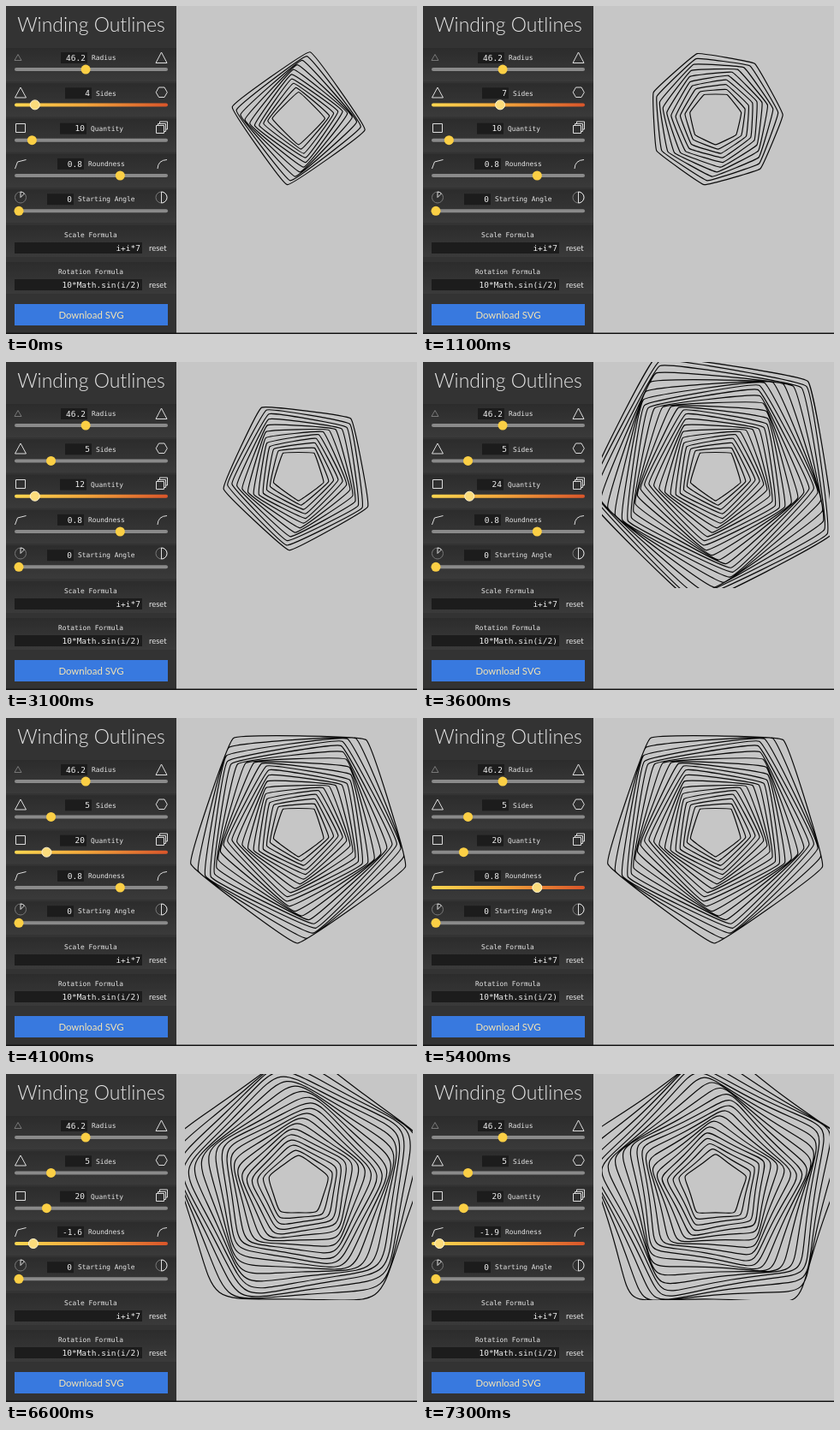
An HTML page that plays this animation: 480 px wide and 383 px high, repeating every 7400 ms.

```html
<!DOCTYPE html>
<html lang="en">
<head>
<meta charset="utf-8">
<title>Winding Outlines</title>
<style>
  html, body { margin: 0; height: 100%; overflow: hidden; background: #c6c6c6; }
  svg { display: block; }
  text { fill: #e6e6e6; font-family: "DejaVu Sans Mono", monospace; font-size: 7.9px; }
  .value { font-size: 9.5px; text-anchor: end; fill: #eee; }
  .sans { font-family: Lato, sans-serif; }
  .mid { text-anchor: middle; }
  .icon { fill: none; stroke: #ddd; stroke-width: 1; }
  .dim { stroke: #777; }
  .box { fill: #1c1c1c; }
</style>
</head>
<body>
<svg id="stage" width="480" height="383" viewBox="0 0 480 383"></svg>
<script>
const LOOP = 7400, STEP = 100;
const UNIT = 0.665, CX = 341.7, CY = 131.2;
const stage = document.getElementById('stage');

// x: right edge of the value box
const sliders = [
  { key: 'radius', label: 'Radius', min: 0, max: 100, x: 95, digits: 1,
    icons: '<path d="M14 56.5L18 63.5H10Z" class="dim"/><path d="M181.5 54L188 66.5H175Z"/>' },
  { key: 'sides', label: 'Sides', min: 3, max: 12, x: 100, digits: 0,
    icons: '<path d="M17 95L23.5 107H10.5Z"/><path d="M178.5 95H185L188.3 100.8L185 106.5H178.5L175.2 100.8Z"/>' },
  { key: 'quantity', label: 'Quantity', min: 1, max: 100, x: 94, digits: 0,
    icons: '<path d="M11.5 137.5h11v10h-11Z"/><path d="M175.5 139.5h9v9h-9ZM177.5 139v-1.5h9v9h-1.5M179.5 137v-2h9v9h-1.5"/>' },
  { key: 'roundness', label: 'Roundness', min: -2, max: 2, x: 91, digits: 1,
    icons: '<path d="M10.5 190L13.5 182L23.5 179.5"/><path d="M177 190Q177.5 180 188 179.5"/>' },
  { key: 'angle', label: 'Starting Angle', min: 0, max: 360, x: 79, digits: 0,
    icons: '<circle cx="17" cy="223.5" r="6.5" class="dim"/><path d="M17 217V223.5L21.5 219A6.5 6.5 0 0 0 17 217Z"/>' +
      '<circle cx="181.5" cy="223.5" r="6.5" class="dim"/><path d="M181.5 217V230A6.5 6.5 0 0 0 181.5 217Z"/>' },
];
const formulas = [['Scale Formula', 'i+i*7', 270], ['Rotation Formula', '10*Math.sin(i/2)', 313]];

const rect = (x, y, w, h, extra) => `<rect x="${x}" y="${y}" width="${w}" height="${h}" ${extra}/>`;
const rowY = k => 60 + 41.3 * k;

function sliderMarkup(s, k) {
  const y = rowY(k);
  return rect(0, y - 11, 199, 39, 'fill="url(#band)"') +
    `<g class="icon">${s.icons}</g>` +
    rect(s.x - 31, y - 6, 31, 13, 'class="box"') +
    `<text class="value" id="${s.key}Value" x="${s.x - 2}" y="${y + 3.6}"></text>` +
    `<text x="${s.x + 5}" y="${y + 3.2}">${s.label}</text>` +
    rect(10, y + 12.1, 179, 4, `rx="2" id="${s.key}Track"`) +
    `<circle id="${s.key}Thumb" cy="${y + 14.1}" r="5.5"/>`;
}

function formulaMarkup([label, code, y]) {
  return rect(0, y - 14, 199, 37, 'fill="url(#band)"') +
    `<text class="mid" x="99" y="${y - 0.5}">${label}</text>` +
    rect(10, y + 6, 149, 13, 'class="box"') +
    `<text class="value" x="157" y="${y + 16}">${code}</text>` +
    `<text class="sans" x="167" y="${y + 15.5}" style="font-size:9.4px">reset</text>`;
}

stage.innerHTML = `
  <defs>
    <linearGradient id="band" x2="0" y2="1">
      <stop stop-color="#2c2c2c"/><stop offset="1" stop-color="#3a3a3a"/>
    </linearGradient>
    <linearGradient id="hot">
      <stop stop-color="#fbd650"/><stop offset=".45" stop-color="#f3a83c"/><stop offset="1" stop-color="#d9552a"/>
    </linearGradient>
    <clipPath id="view">${rect(209, 0, 266, 264, '')}</clipPath>
  </defs>
  ${rect(0, 0, 480, 383, 'fill="#c6c6c6"')}
  <path id="art" clip-path="url(#view)" fill="none" stroke="#0a0a0a" stroke-width="1.2"/>
  ${rect(0, 0, 199, 383, 'fill="#333"')}
  <text class="sans mid" x="99.5" y="30" style="font-size:23px;font-weight:300">Winding Outlines</text>
  ${sliders.map(sliderMarkup).join('')}
  ${formulas.map(formulaMarkup).join('')}
  ${rect(10, 348, 179, 25, 'fill="#3879df"')}
  <text class="sans mid" x="99.5" y="364.5" style="font-size:11.4px;fill:#f3e3b4">Download SVG</text>
  ${rect(0, 381.5, 480, 1.5, 'fill="#151515"')}`;

// Linear interpolation through [time, value] keys
function track(keys, t) {
  const n = keys.findIndex(k => k[0] > t);
  if (n < 0) return keys[keys.length - 1][1];
  if (n === 0) return keys[0][1];
  const [t0, a] = keys[n - 1], [t1, b] = keys[n];
  return a + (b - a) * (t - t0) / (t1 - t0);
}

const sidesKeys = [[0, 4], [700, 7], [1850, 7], [2400, 5]];
const quantityKeys = [[2800, 10], [3100, 12], [3500, 23], [3600, 24], [4050, 20]];
const roundKeys = [[5500, 0.8], [5900, 0.4], [6000, -0.5], [6600, -1.6], [7300, -1.9]];

function stateAt(t) {
  return {
    radius: 46.2,
    sides: Math.round(track(sidesKeys, t)),
    quantity: Math.round(track(quantityKeys, t)),
    roundness: Math.round(track(roundKeys, t) * 10) / 10,
    angle: 0,
    active: t < 2700 ? 'sides' : t < 5100 ? 'quantity' : 'roundness',
  };
}

// Closed cardinal spline through the corners of a regular polygon
function polygonPath(sides, r, turn, tension) {
  const corner = k => {
    const a = 2 * Math.PI * k / sides + turn;
    return [CX + r * Math.sin(a), CY + r * Math.cos(a)];
  };
  const handle = (k, sign) => {
    const p = corner(k), before = corner(k - 1), after = corner(k + 1);
    return p.map((v, d) => v + sign * (1 - tension) / 6 * (after[d] - before[d]));
  };
  const point = p => p.map(v => v.toFixed(2)).join(' ');
  let d = 'M' + point(corner(0));
  for (let k = 0; k < sides; k++) {
    d += 'C' + [handle(k, 1), handle(k + 1, -1), corner(k + 1)].map(point).join(' ');
  }
  return d + 'Z';
}

const set = (id, attrs) => {
  const el = document.getElementById(id);
  for (const name in attrs) el.setAttribute(name, attrs[name]);
};

function draw(t) {
  const state = stateAt(t);
  for (const s of sliders) {
    const value = state[s.key], hot = s.key === state.active;
    document.getElementById(s.key + 'Value').textContent = value.toFixed(s.digits);
    set(s.key + 'Track', { fill: hot ? 'url(#hot)' : '#8a8a8a' });
    set(s.key + 'Thumb', {
      cx: 15 + 169 * (value - s.min) / (s.max - s.min),
      fill: hot ? '#fbdc7c' : '#fbcf45',
      stroke: hot ? '#fff3cf' : 'none',
    });
  }
  let d = '';
  for (let i = 0; i < state.quantity; i++) {
    const r = UNIT * (state.radius + i + i * 7);
    const turn = (state.angle + 10 * Math.sin(i / 2)) * Math.PI / 180;
    d += polygonPath(state.sides, r, turn, state.roundness);
  }
  set('art', { d });
}

const start = performance.now();
function frame() {
  const t = (performance.now() - start) % LOOP;
  draw(Math.floor(t / STEP) * STEP);
  requestAnimationFrame(frame);
}
frame();
</script>
</body>
</html>
```
